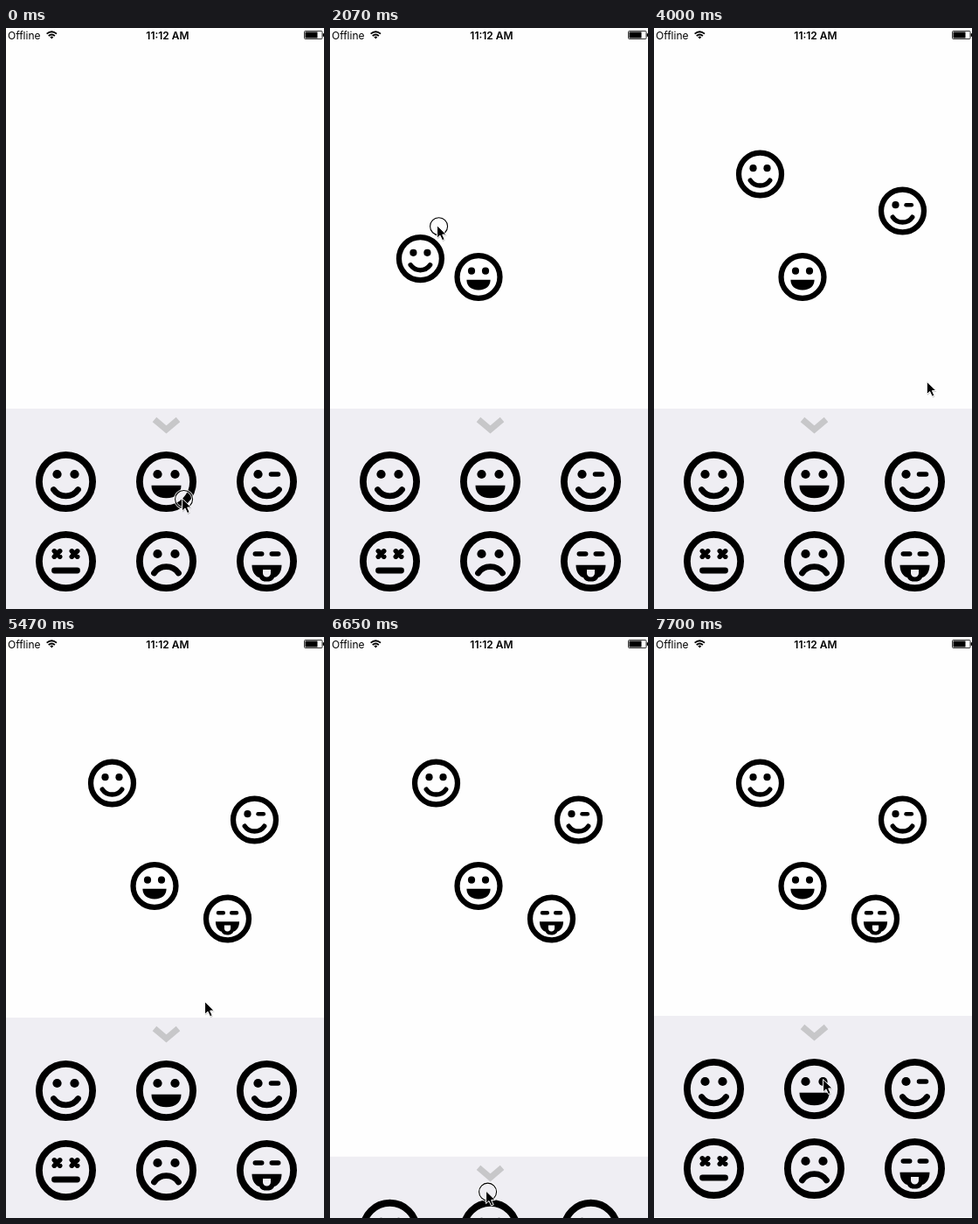
Recreate the animation shown at these times as an HTML page. Size 364x664 px, loop 8 s.

```html
<!DOCTYPE html>
<html lang="en">
<head>
<meta charset="utf-8">
<title>Sticker tray</title>
<style>
  html, body { margin: 0; height: 100%; overflow: hidden; background: #fefefe; }
  svg { display: block; width: 100vw; height: 100vh; }
  text { font: 12px Inter, Roboto, sans-serif; }
  .time { font-weight: 600; text-anchor: middle; }
  .line { fill: none; stroke: #000; stroke-width: 6.8; stroke-linecap: round; }
  .thin { stroke-width: 5.5; }
</style>
</head>
<body>
<svg viewBox="0 0 364 664">
  <defs>
    <circle id="ring" r="30.6" fill="none" stroke="#000" stroke-width="7.8"/>
    <g id="eyes"><circle cx="-10" cy="-8.5" r="5.1"/><circle cx="10" cy="-8.5" r="5.1"/></g>
    <path id="curve" class="line" d="M-14 9A17 17 0 0 0 14 9"/>
    <path id="bowl" d="M-17 4.2H17C17 13 11 18.8 0 18.8S-17 13-17 4.2Z"/>
    <g id="smile"><use href="#ring"/><use href="#eyes"/><use href="#curve"/></g>
    <g id="grin"><use href="#ring"/><use href="#eyes"/><use href="#bowl"/></g>
    <g id="wink">
      <use href="#ring"/><use href="#curve"/>
      <circle cx="-10" cy="-8.5" r="5.1"/>
      <path class="line thin" d="M5-8.5H13"/>
    </g>
    <g id="dead">
      <use href="#ring"/>
      <path class="line thin" d="M-13.2-11.7l6.4 6.4m0-6.4l-6.4 6.4M6.8-11.7l6.4 6.4m0-6.4l-6.4 6.4"/>
      <path class="line" d="M-13 10.5H13"/>
    </g>
    <g id="sad">
      <use href="#ring"/><use href="#eyes"/>
      <path class="line" d="M-14 13.5A17 17 0 0 1 14 13.5"/>
    </g>
    <g id="tongue">
      <use href="#ring"/>
      <path class="line thin" d="M-13.2-8.5H-5.8M5.8-8.5H13.2"/>
      <path fill-rule="evenodd" d="M-17 4.2H17C17 12 13 17.5 8.5 18.4C7 22 4 23 0 23S-7 22-8.5 18.4C-13 17.5-17 12-17 4.2ZM-4.5 9.5V13.5A4.5 4.5 0 0 0 4.5 13.5V9.5Z"/>
    </g>
    <path id="arrow" d="M0 0V14.5L3.4 11.4L6 17L8.6 15.9L6.1 10.4H10.6Z"/>
  </defs>

  <rect width="364" height="664" fill="#fefefe"/>
  <text x="2" y="12.7">Offline</text>
  <text class="time" x="185" y="12.7">11:12 AM</text>
  <path d="M46.6 6.6Q52.3 1.9 58 6.6M48.7 9Q52.3 6 55.9 9" fill="none" stroke="#000" stroke-width="1.8"/>
  <path d="M50.3 10.3Q52.3 8.8 54.3 10.3L52.3 12.5Z"/>
  <rect x="341.5" y="3.5" width="20.5" height="9" rx="1" fill="none" stroke="#000" stroke-width=".8"/>
  <rect x="342.5" y="4.5" width="14" height="7"/>
  <rect x="362.6" y="6.2" width="1.4" height="3.6"/>

  <g id="tray">
    <rect width="364" height="230" fill="#efeef3"/>
    <path d="M170 12.5L183.5 24L197 12.5" fill="none" stroke="#c7c7c9" stroke-width="7"/>
  </g>
  <g id="stickers"></g>
  <g id="pointer">
    <g id="touch" fill="none" transform="translate(.6 .5)">
      <circle r="10" stroke="#fff" stroke-opacity=".75" stroke-width="3"/>
      <circle r="10" stroke="#000" stroke-width="1.1"/>
    </g>
    <use href="#arrow" x="-.8" y=".9" opacity=".2"/>
    <use href="#arrow" x="-1.4" y="-.5" stroke="#fff"/>
  </g>
</svg>
<script>
const LOOP = 8000, BEAT = 147.8, LAST = 52;
const TRAY_Y = 435, TRAY_DROP = 178.5, LAG = 0.15;
const FACES = ['smile', 'grin', 'wink', 'dead', 'sad', 'tongue'];

const $ = id => document.getElementById(id);
const clamp = (v, lo = 0, hi = 1) => Math.min(hi, Math.max(lo, v));
const mix = (a, b, k) => a + (b - a) * k;
const easeOut = k => k * (2 - k);
const smooth = k => k * k * (3 - 2 * k);

// Place of a face inside the tray
function home(name) {
  const i = FACES.indexOf(name);
  return [68.5 + 115 * (i % 3), 83.5 + 91 * Math.floor(i / 3)];
}

function addFace(parent, name) {
  const el = document.createElementNS('http://www.w3.org/2000/svg', 'use');
  el.setAttribute('href', '#' + name);
  return parent.appendChild(el);
}

function move(el, x, y, scale = 1) {
  el.setAttribute('transform', `translate(${x} ${y}) scale(${scale})`);
}

function show(el, on) {
  el.setAttribute('visibility', on ? 'visible' : 'hidden');
}

// Times in beats; grip is the finger relative to the sticker centre
const drags = [
  { name: 'grin', press: 0, grab: 3, drop: 6.6, leave: 7, grip: [15.5, -0.5], rest: [170, 284.5] },
  { name: 'smile', press: 10, grab: 11.4, drop: 16.55, leave: 17, grip: [18.7, -27], rest: [121.5, 167] },
  { name: 'wink', press: 22, grab: 23.4, drop: 25.7, leave: 26, grip: [16, -33], rest: [284.5, 209] },
  { name: 'tongue', press: 29.2, grab: 31.5, drop: 34.6, leave: 35, grip: [13.5, -20], rest: [253.5, 322], bend: 0.25 }
];

// bend curves the way to a stop by letting x run ahead (<1) or behind (>1)
const stop = (n, x, y, bend = 1, ease = easeOut) => ({ n, x, y, bend, ease });

function dragStops({ name, press, grab, drop, leave, grip, rest, bend }) {
  const [hx, hy] = home(name);
  const x = hx + grip[0], y = TRAY_Y + hy + grip[1];
  const end = [rest[0] + grip[0], rest[1] + grip[1]];
  return [
    stop(press, x + 4, y + 20, bend),
    stop(grab, x, y),
    stop(drop, ...end, 1.3),
    stop(leave, ...end)
  ];
}

const pull = { press: 40, leave: 45.4 }, push = { press: 48, leave: 50 };
const stops = [
  ...drags.flatMap(dragStops),
  stop(pull.press, 179, 482, 1.88),
  stop(pull.leave, 180, 636, 1, smooth),
  stop(push.press, 190, 636),
  stop(push.leave, 194, 506),
  stop(LAST, 195, 506)
];
const presses = [...drags, pull, push];

function pointerAt(n) {
  const i = Math.max(1, stops.findIndex(s => s.n >= n));
  const a = stops[i - 1], b = stops[i];
  const k = b.ease((n - a.n) / (b.n - a.n));
  return [mix(a.x, b.x, k ** b.bend), mix(a.y, b.y, k)];
}

function trayAt(n) {
  return n <= push.leave
    ? TRAY_DROP * smooth(clamp((n - pull.press) / 6.3))
    : mix(TRAY_DROP, -2, easeOut(clamp((n - push.leave) / 2)));
}

// The picture advances in even beats and rests twice
function beatAt(ms) {
  const n = Math.min(LAST, Math.floor((ms + 10) / BEAT));
  return n === 3 || n === 15 ? n - 1 : n;
}

function draw(ms) {
  const n = beatAt(ms);
  move($('tray'), 0, TRAY_Y + trayAt(n));
  for (const d of drags) {
    const [x, y] = pointerAt(clamp(n - LAG, d.grab, d.drop));
    move(d.el, x - d.grip[0], y - d.grip[1], 0.8);
    show(d.el, n > d.grab);
  }
  move($('pointer'), ...pointerAt(n));
  show($('touch'), presses.some(p => n >= p.press && n <= p.leave));
}

for (const name of FACES) move(addFace($('tray'), name), ...home(name));
for (const d of drags) d.el = addFace($('stickers'), d.name);

const start = performance.now();
function tick() {
  draw((performance.now() - start) % LOOP);
  requestAnimationFrame(tick);
}
tick();
</script>
</body>
</html>
```
